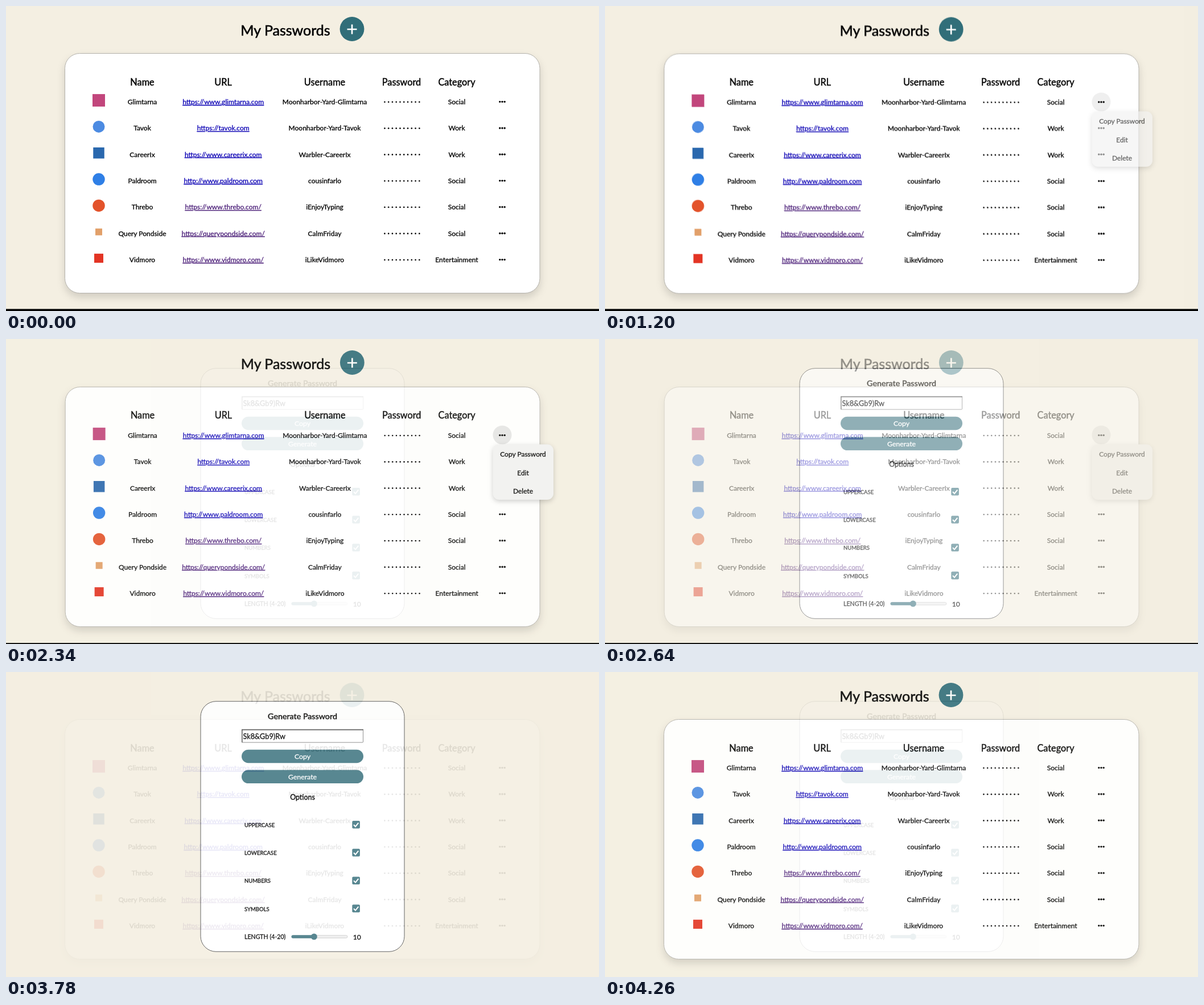
Recreate the animation shown at these times as an HTML page. Size 1042 by 537 pixels, loop 4320 ms.

```html
<!DOCTYPE html>
<html lang="en">
<head>
<meta charset="utf-8">
<title>My Passwords</title>
<style>
  html, body { margin: 0; width: 100%; height: 100%; overflow: hidden; background: #f4efe2; }
  svg { display: block; width: 100%; height: 100%; }
  text { font: 12px Lato, sans-serif; fill: #000; stroke: #000; stroke-width: .3px; text-anchor: middle; }
  .title { font-size: 25px; stroke-width: .55px; }
  .head { font-size: 16.3px; stroke-width: .4px; }
  .heading { font-size: 14.3px; stroke-width: .4px; }
  .link { fill: #0b00b4; stroke: #0b00b4; text-decoration: underline; }
  .visited { fill: #4b1e78; stroke: #4b1e78; text-decoration: underline; }
  .light { fill: #fff; stroke: #fff; font-size: 12.3px; }
  .label { font-size: 9.5px; text-anchor: start; }
  .length { font-size: 10.6px; text-anchor: start; }
  .value { font-size: 12.7px; text-anchor: start; }
  .card { fill: #fff; stroke: #b3b1ab; filter: drop-shadow(0 7px 7px rgba(0, 0, 0, .14)); }
  .menu { fill: #f1f1f1; filter: drop-shadow(0 3px 4px rgba(0, 0, 0, .2)); }
</style>
</head>
<body>
<svg viewBox="0 0 1042 537" preserveAspectRatio="none">
  <rect width="1042" height="537" fill="#f4efe2"/>
  <g id="table"></g>
  <g id="menuScene"></g>
  <g id="modalScene"></g>
  <rect id="edge" width="1042" height="4"/>
</svg>
<script>
const TEAL = '#477b86';
const byId = id => document.getElementById(id);
const range = n => [...Array(n).keys()];
const text = (x, y, content, cls = '') => `<text x="${x}" y="${y}" class="${cls}">${content}</text>`;
const box = (x, y, w, h, r, attrs) => `<rect x="${x}" y="${y}" width="${w}" height="${h}" rx="${r}" ${attrs}/>`;
const dot = (x, y, r, fill = '#000') => `<circle cx="${x}" cy="${y}" r="${r}" fill="${fill}"/>`;
const line = (d, color, width) => `<path d="${d}" fill="none" stroke="${color}" stroke-width="${width}"/>`;
const backdrop = box(0, 0, 1042, 537, 0, 'fill="#f4efe2"');

// icon shape, icon size, icon color, name, address, user, category
const entries = [
  ['square', 22, '#c2467c', 'Glimtarna', 'https://www.glimtarna.com', 'Moonharbor-Yard-Glimtarna', 'Social'],
  ['circle', 21, '#4c8be2', 'Tavok', 'https://tavok.com', 'Moonharbor-Yard-Tavok', 'Work'],
  ['square', 19.5, '#2a68ae', 'CareerIx', 'https://www.careerix.com', 'Warbler-CareerIx', 'Work'],
  ['circle', 21.5, '#2f7fe6', 'Paldroom', 'http://www.paldroom.com', 'cousinfarlo', 'Social'],
  ['circle', 21.5, '#e3532b', 'Threbo', 'https://www.threbo.com/', 'iEnjoyTyping', 'Social'],
  ['square', 12, '#e2a06a', 'Query Pondside', 'https://querypondside.com/', 'CalmFriday', 'Social'],
  ['square', 16, '#e33424', 'Vidmoro', 'https://www.vidmoro.com/', 'iLikeVidmoro', 'Entertainment'],
];

function entryRow([shape, size, color, name, address, user, category], i) {
  const y = 168.6 + i * 46.33, base = y + 4.4, iconY = y - 2.5;
  const icon = shape === 'circle'
    ? dot(163, iconY, size / 2, color)
    : box(163 - size / 2, iconY - size / 2, size, size, 0, `fill="${color}"`);
  return icon +
    text(239.5, base, name) +
    text(381.7, base, address, i < 4 ? 'link' : 'visited') +
    text(560, base, user) +
    range(10).map(k => dot(665.4 + k * 6.77, y + .4, 1.3)).join('') +
    text(792, base, category) +
    range(3).map(k => dot(867.8 + k * 4.2, y, 1.7)).join('');
}

byId('table').innerHTML =
  text(491, 52, 'My Passwords', 'title') +
  dot(608, 40.5, 21.4, '#316e79') +
  line('M599.5 41H616.5M608 32.5V49.5', '#fff', 2.7) +
  box(103.5, 83.5, 834.5, 422, 26, 'class="card"') +
  [['Name', 239.5], ['URL', 381.5], ['Username', 560], ['Password', 695], ['Category', 792]]
    .map(([label, x]) => text(x, 139.5, label, 'head')).join('') +
  entries.map(entryRow).join('');

byId('menuScene').innerHTML = backdrop +
  dot(872, 169, 16.5, '#e5e5e5') +
  `<g style="mix-blend-mode:multiply"></g>` +
  '<use href="#table" transform="translate(.75 1) scale(.9993 1)"/>' +
  dot(872, 169, 16.5, '#e5e5e5') +
  range(3).map(k => dot(867.8 + k * 4.2, 169.4, 1.7)).join('') +
  box(855.5, 185.5, 106.5, 97.5, 11, 'class="menu"') +
  ['Copy Password', 'Edit', 'Delete'].map((s, i) => text(908.5, 207 + i * 32.5, s)).join('');

const button = (y, label) =>
  box(414, y, 214, 23.5, 11.75, `fill="${TEAL}"`) + text(521, y + 16.4, label, 'light');

const option = (label, i) => {
  const y = 269 + i * 49.2;
  return text(419, y + 4, label, 'label') +
    box(608.3, y - 7, 13.6, 13.6, 2, `fill="${TEAL}"`) +
    line(`M611 ${y}l3 3.2l5.3 -6.6`, '#fff', 2);
};

byId('modalScene').innerHTML = backdrop +
  box(342, 51.7, 358, 440.6, 27, 'fill="#fff" stroke="#555"') +
  text(521, 83, 'Generate Password', 'heading') +
  box(414.5, 101.5, 213, 22.5, 1, 'fill="#fff" stroke="#858585"') +
  line('M414.8 124V101.6H628', '#555', 1.6) +
  text(416.5, 117.6, 'Sk8&amp;Gb9)Rw', 'value') +
  button(136.8, 'Copy') +
  button(172.6, 'Generate') +
  text(521, 225.2, 'Options', 'heading" style="font-size:12.4px') +
  ['UPPERCASE', 'LOWERCASE', 'NUMBERS', 'SYMBOLS'].map(option).join('') +
  text(419, 470, 'LENGTH (4-20)', 'length') +
  box(502, 463.7, 98, 4.6, 2.3, 'fill="#efefef" stroke="#c4c4c4" stroke-width=".8"') +
  box(501.5, 463.3, 40, 5.4, 2.7, `fill="${TEAL}"`) +
  dot(541.3, 466, 5.5, TEAL) +
  text(616.7, 470.5, '10');

const LOOP = 4320;
// Crossfades advance by a tenth every 60 ms.
const fade = since => Math.min(10, Math.max(0, Math.floor(since / 60) + 1)) / 10;

function show(scene, opacity) {
  scene.setAttribute('opacity', opacity);
  scene.setAttribute('visibility', opacity ? 'visible' : 'hidden');
}

function draw(now) {
  const t = now % LOOP;
  show(byId('menuScene'), t < 2880 ? fade(t - 900) : 0);
  show(byId('modalScene'), t < 3780 ? fade(t - 2340) : 1 - fade(t - 3780));
  // The bottom edge switches hard, outside the crossfades.
  byId('edge').setAttribute('y', t < 1440 ? 533.4 : t < 2880 ? 535.2 : 537);
}

let start;
function tick(now) {
  start ??= now;
  draw(now - start);
  requestAnimationFrame(tick);
}
draw(0);
requestAnimationFrame(tick);
</script>
</body>
</html>
```
